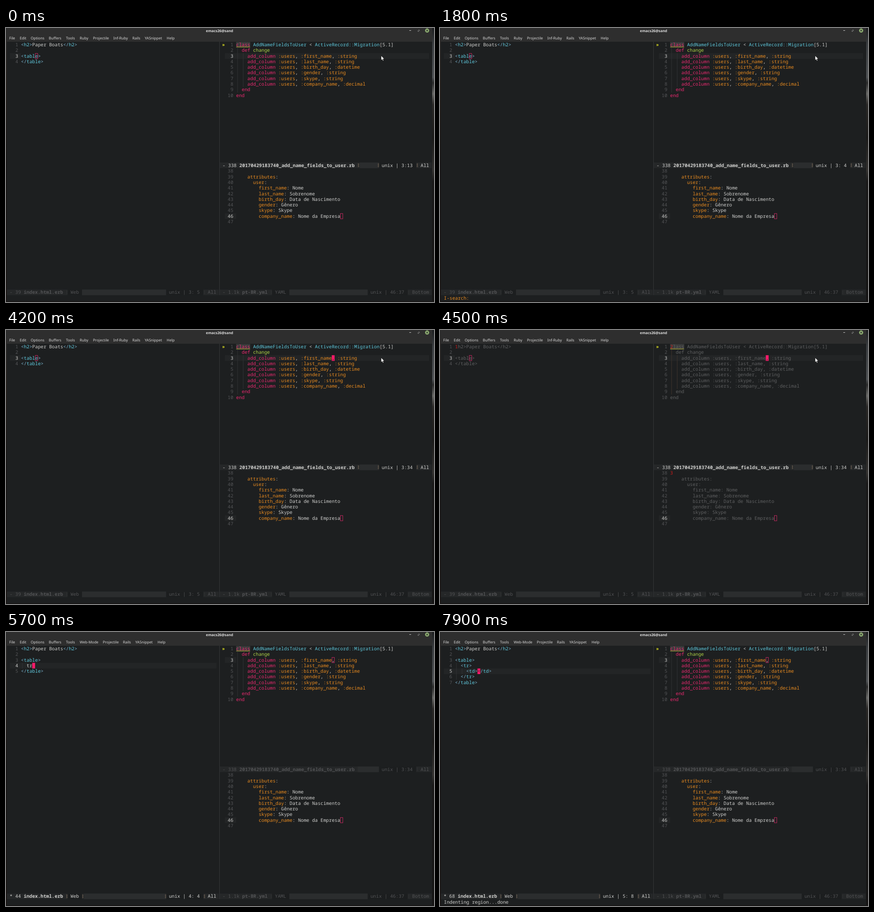
Recreate the animation shown at these times as an HTML page with a canvas. Size 935 by 599 pixels, loop 8000 ms.

```html
<!DOCTYPE html>
<html lang="en">
<head>
<meta charset="utf-8">
<title>Editor session</title>
<style>
html, body { margin: 0; width: 935px; height: 599px; overflow: hidden; background: #1d1f20; }
canvas { display: block; }
</style>
</head>
<body>
<canvas id="stage" width="935" height="599"></canvas>
<script>
const ctx = document.getElementById('stage').getContext('2d');
const LOOP = 8000, CW = 6.143, LH = 12.28, ASC = 9.4;
const MONO = '"Noto Sans Mono", "DejaVu Sans Mono", monospace';
const SANS = '"Noto Sans", "Open Sans", sans-serif';
const C = {
  bg: '#1d1f20', line: '#232526', fg: '#d0d0ce', dim: '#545557', grey: '#5f6061',
  pink: '#ea2a70', cursor: '#fd1a6a', orange: '#ea8c20', cyan: '#60cade', green: '#b0d448',
  bracket: '#7fb6d2', guide: '#323436', yellow: '#d2d420', red: '#d01c1c'
};

// Each syntax: a pattern whose groups map to the listed colours.
const SYNTAX = {
  ruby: [/(class\b|def\b|end\b|add_column)|([A-Z]\w*(?:::[A-Z]\w*)*)|(:\w+)|(change)|\S+/g,
    [C.pink, C.cyan, C.orange, C.green]],
  html: [/(<\/?|>)|(?<=<\/?)(\w+)|[^\s<>]+/g, [C.bracket, C.cyan]],
  yaml: [/(\w+)(?=:)|\S+/g, [C.orange]]
};

const fields = [
  ['first_name', 'string', 'Nome'], ['last_name', 'string', 'Sobrenome'],
  ['birth_day', 'datetime', 'Data de Nascimento'], ['gender', 'string', 'Gênero'],
  ['skype', 'string', 'Skype'], ['company_name', 'decimal', 'Nome da Empresa']
];
const ruby = [
  'class AddNameFieldsToUser < ActiveRecord::Migration[5.1]', '  def change',
  ...fields.map(([name, type]) => `    add_column :users, :${name}, :${type}`),
  '  end', 'end'
];
const yaml = ['', '    attributes:', '      user:',
  ...fields.map(([name, , label]) => `        ${name}: ${label}`), ''];

const row = ['  <tr>', '    ', '  </tr>'];
const withCell = cell => [row[0], row[1] + cell, row[2]];
const search = { ask: 'I-search: ', echo: '' };
const done = { ask: '', typed: '', match: -1 };
const prompt = { ask: 'Choose a snippet: ', mini: true };
const closed = { ask: '', mini: false };
const indented = 'Indenting region...done';

const steps = [
  [0, { left: false, col: 13, on: false, echo: '', ask: '', typed: '', match: -1, mark: -1,
    ace: false, mouse: true, mini: false, inner: [], at: [3, 5] }],
  [500, { on: true }],
  [600, { echo: 'Quit' }],
  [1100, { on: false }],
  [1300, { on: true, col: 4, echo: '' }],
  [1800, { on: false, ...search }],
  [1900, { on: true }],
  [2200, { typed: 'f', col: 25, match: 24 }],
  [2800, { ...done, col: 24, echo: 'Mark saved where search started' }],
  [3000, { echo: 'Mark set', mark: 24 }],
  [3200, search],
  [3500, { typed: ',', col: 35, match: 34 }],
  [3800, { ...done, col: 34 }],
  [4200, { mark: -1 }],
  [4500, { ace: true }],
  [5000, { ace: false, left: true }],
  [5300, { mouse: false, inner: ['  '], at: [4, 2] }],
  [5500, { inner: ['  t'], at: [4, 3] }],
  [5700, { inner: ['  tr'], at: [4, 4] }],
  [5900, prompt],
  [6100, { ...closed, echo: indented, inner: row, at: [5, 4] }],
  [6600, { echo: '', inner: withCell('t'), at: [5, 5] }],
  [6800, { inner: withCell('td'), at: [5, 6] }],
  [7000, prompt],
  [7100, { ...closed, inner: withCell('<td></td>'), at: [5, 7] }],
  [7700, { on: false }],
  [7900, { on: true, echo: indented, at: [5, 8] }]
];

function stateAt(t) {
  return Object.assign({}, ...steps.filter(s => s[0] <= t).map(s => s[1]));
}

function rect(x, y, w, h, color) {
  ctx.fillStyle = color;
  ctx.fillRect(x, y, w, h);
}

function text(str, x, y, color, weight = 400, size = 10.24, family = MONO) {
  ctx.font = `${weight} ${size}px ${family}`;
  ctx.fillStyle = color;
  ctx.fillText(str, x, y);
}

function stroke(points, color, width = 1) {
  ctx.strokeStyle = color;
  ctx.lineWidth = width;
  ctx.beginPath();
  points.forEach(([x, y]) => ctx.lineTo(x, y));
  ctx.stroke();
}

function code(line, x, y, lang, flat) {
  const [pattern, colors] = SYNTAX[lang];
  for (const m of line.matchAll(pattern)) {
    const group = m.slice(1).findIndex(Boolean);
    const color = flat ? C.grey : group < 0 ? C.fg : colors[group];
    text(m[0], x + m.index * CW, y, color);
  }
}

function cursor(p, line, col, solid) {
  const x = p.x + col * CW, y = p.y + line * LH;
  if (solid) {
    rect(x, y, CW, LH, C.cursor);
    text(p.lines[line][col] || '', x, y + ASC, C.bg);
  } else {
    ctx.strokeStyle = '#d42a66';
    ctx.lineWidth = 0.9;
    ctx.strokeRect(x + 0.45, y + 0.45, CW - 0.9, LH - 0.9);
  }
}

function pane(p, s) {
  const [line, col] = p.at;
  const top = p.y + line * LH;
  rect(p.x - 4 * CW, top, p.active ? p.right - p.x + 4 * CW : 4 * CW, LH, C.line);
  if (p.flagged) rect(p.x, p.y, p.flagged * CW, LH, '#3b3c3c');
  if (p.mark >= 0 && col > p.mark)
    rect(p.x + p.mark * CW, top, (col - p.mark) * CW, LH, '#4e4e4e');
  p.lines.forEach((str, i) => {
    const y = p.y + i * LH + ASC, num = String(p.first + i);
    text(num, p.x - (1 + num.length) * CW, y, i === line ? C.fg : C.dim);
    if (p.lang !== 'yaml') {
      const indent = str.search(/\S|$/);
      for (let c = 0; c < indent; c += 2)
        rect(p.x + c * CW + 2.6, y - ASC, 1, LH, s.ace ? '#41362f' : C.guide);
    }
    if (s.ace && i === 0) {
      text(p.key, p.x, y, C.red);
      str = ' ' + str.slice(1);
    }
    code(str, p.x, y, p.lang, s.ace);
  });
  if (p.match >= 0) {
    const x = p.x + p.match * CW;
    rect(x, top, CW, LH, C.orange);
    text(p.lines[line][p.match], x, top + ASC, C.bg, 700);
  }
  const focused = p.active && !s.mini;
  if (!focused || s.on) cursor(p, line, col, focused);
}

function arrow(x, y, dir, color) {
  ctx.fillStyle = color;
  ctx.beginPath();
  ctx.moveTo(x, y + 1.5);
  ctx.quadraticCurveTo(x + dir * 4.5, y + 2, x + dir * 2, y + 6);
  ctx.quadraticCurveTo(x + dir * 4.5, y + 10, x, y + 10.5);
  ctx.fill();
}

function modeline(m) {
  const color = m.active ? C.fg : '#525355', base = m.y + 9.6;
  const band = (from, to, fill) => rect(from, m.y, to - from, 12.3, fill);
  const x = m.x0 + 6;
  const nameX = x + (3 + m.size.length) * CW;
  const nameEnd = nameX + m.name.length * CW;
  const modeX = nameEnd + 16.3;
  const modeEnd = m.mode ? modeX + m.mode.length * CW : nameEnd;
  const whereX = m.right - m.where.length * CW;
  const pos = 'unix | ' + m.pos;
  const posX = whereX - 17.4 - pos.length * CW;
  const dark = '#1c1e1f';
  band(m.x0, m.x1, '#252728');
  band(modeEnd + (m.active ? 11 : 6.5), posX - 6, '#2b2d2e');
  if (m.mode) band(nameEnd + 10, modeEnd + 6.5, dark);
  band(posX - 6, whereX - 10, dark);

  const edge = m.active ? '#514a43' : '#2b2d2e';
  arrow(nameEnd + 7, m.y, 1, edge);
  if (m.mode && m.active) arrow(modeEnd + 7, m.y, 1, edge);
  if (m.active) arrow(posX - 6, m.y, -1, edge);
  arrow(whereX - 6, m.y, -1, edge);
  text(m.flag, x, base, color);
  text(m.size, x + 2 * CW, base, color);
  text(m.name, nameX, base, color, 700);
  if (m.mode) text(m.mode, modeX, base, color);
  text(pos, posX, base, color);
  text(m.where, whereX, base, color);
}

function desktopStrip(x, w, tones) {
  const g = ctx.createLinearGradient(0, 0, 0, 599);
  tones.forEach(([at, color]) => g.addColorStop(at, color));
  rect(x, 0, w, 599, g);
}

function menu(s) {
  const base = ['File', 7, 'Edit', 30, 'Options', 54, 'Buffers', 93.5, 'Tools', 131];
  const extra = s.mini ? ['Minibuf', 161, 'Help', 200]
    : s.left ? ['Web-Mode', 161, 'Projectile', 211.5, 'Rails', 255.5, 'YASnippet', 282.5, 'Help', 331]
    : ['Ruby', 161, 'Projectile', 190, 'Inf-Ruby', 234.5, 'Rails', 276, 'YASnippet', 303, 'Help', 351];
  const items = [...base, ...extra];
  for (let i = 0; i < items.length; i += 2)
    text(items[i], items[i + 1], 25, '#dadada', 400, 8, SANS);
}

function chrome(s) {
  rect(0, 0, 935, 599, C.bg);
  rect(0, 0, 935, 30, '#2e2e2e');
  desktopStrip(0, 2, [[0, '#2a2a2a'], [0.2, '#26201c'], [0.5, '#151313'], [1, '#1a1514']]);
  desktopStrip(931, 4, [[0, '#1c1d1f'], [0.06, '#3a3d40'], [0.18, '#505356'], [0.2, '#2a2a2a'],
    [0.24, '#6a6a68'], [0.28, '#2a2826'], [0.4, '#1a1918'], [0.52, '#343230'], [0.56, '#191818'], [1, '#141313']]);
  rect(0, 597, 935, 2, '#171616');
  ctx.textAlign = 'center';
  text('emacs26@sand', 466.5, 9, '#dedede', 700, 7.8, SANS);
  ctx.textAlign = 'left';
  menu(s);
  rect(881, 5, 4, 1, '#c8c8c8');
  stroke([[901, 4.5], [903, 4.5], [903, 6.5]], '#aaaaaa', 0.8);
  stroke([[900, 5.5], [900, 7.5], [902, 7.5]], '#aaaaaa', 0.8);
  ctx.fillStyle = '#8fb072';
  ctx.beginPath();
  ctx.arc(920, 5.6, 4.5, 0, Math.PI * 2);
  ctx.fill();
  stroke([[918.3, 3.9], [921.7, 7.3]], '#2e2e2e', 1.1);
  stroke([[921.7, 3.9], [918.3, 7.3]], '#2e2e2e', 1.1);
  rect(466, 30, 1, 554, '#343638');
}

function pointer(x, y) {
  const shape = [[0, 0], [0, 10], [2.3, 8], [4, 11.6], [5.6, 10.8], [4, 7.3], [7, 7]];
  ctx.beginPath();
  shape.forEach(([dx, dy]) => ctx.lineTo(x + dx, y + dy));
  ctx.closePath();
  ctx.fillStyle = '#f4f4f4';
  ctx.fill();
  ctx.strokeStyle = '#101010';
  ctx.lineWidth = 0.6;
  ctx.stroke();
}

function echoArea(s) {
  const x = 8.5, y = 594;
  text(s.ask, x, y, C.orange);
  text(s.ask ? s.typed : s.echo, x + s.ask.length * CW, y, C.fg);
  if (s.mini) rect(x + s.ask.length * CW, 584.6, CW, LH, C.cursor);
}

const position = (line, col) => line + ':' + String(col).padStart(2);

function draw(t) {
  const s = stateAt(t);
  const html = ['<h2>Paper Boats</h2>', '', '<table>', ...s.inner, '</table>'];
  const size = html.join('\n').length + 1;
  chrome(s);

  pane({ x: 32.8, y: 30.6, right: 460, first: 1, lines: html, lang: 'html', key: '1',
    at: [s.at[0] - 1, s.at[1]], active: s.left }, s);
  pane({ x: 502.8, y: 30.6, right: 924, first: 1, lines: ruby, lang: 'ruby', key: '2',
    at: [2, s.col], active: !s.left, mark: s.mark, match: s.match, flagged: 5 }, s);
  pane({ x: 502.8, y: 307, right: 924, first: 38, lines: yaml, lang: 'yaml', key: '3',
    at: [8, 37], active: false }, s);

  text('»', 472, 40, C.yellow, 700);
  const wave = Array.from({ length: 21 }, (_, i) => [503 + i * 1.5, i % 2 ? 40.8 : 42.2]);
  stroke(wave, C.yellow, 0.8);

  modeline({ y: 294, x0: 467, x1: 930, right: 924.2, active: !s.left, flag: '-', size: '338',
    name: '20170429183740_add_name_fields_to_user.rb', pos: position(3, s.col), where: 'All' });
  modeline({ y: 571.8, x0: 2, x1: 465, right: 459.3, active: s.left, flag: s.inner.length ? '*' : '-',
    size: String(size), name: 'index.html.erb', mode: 'Web', pos: position(...s.at), where: 'All' });
  modeline({ y: 571.8, x0: 467, x1: 930, right: 924.2, active: false, flag: '-', size: '1.1k',
    name: 'pt-BR.yml', mode: 'YAML', pos: position(46, 37), where: 'Bottom' });

  echoArea(s);
  if (s.mouse) pointer(819.5, 60.5);
}

ctx.textRendering = 'geometricPrecision';
const start = performance.now();
function tick() {
  draw((performance.now() - start) % LOOP);
  requestAnimationFrame(tick);
}
tick();
</script>
</body>
</html>
```
